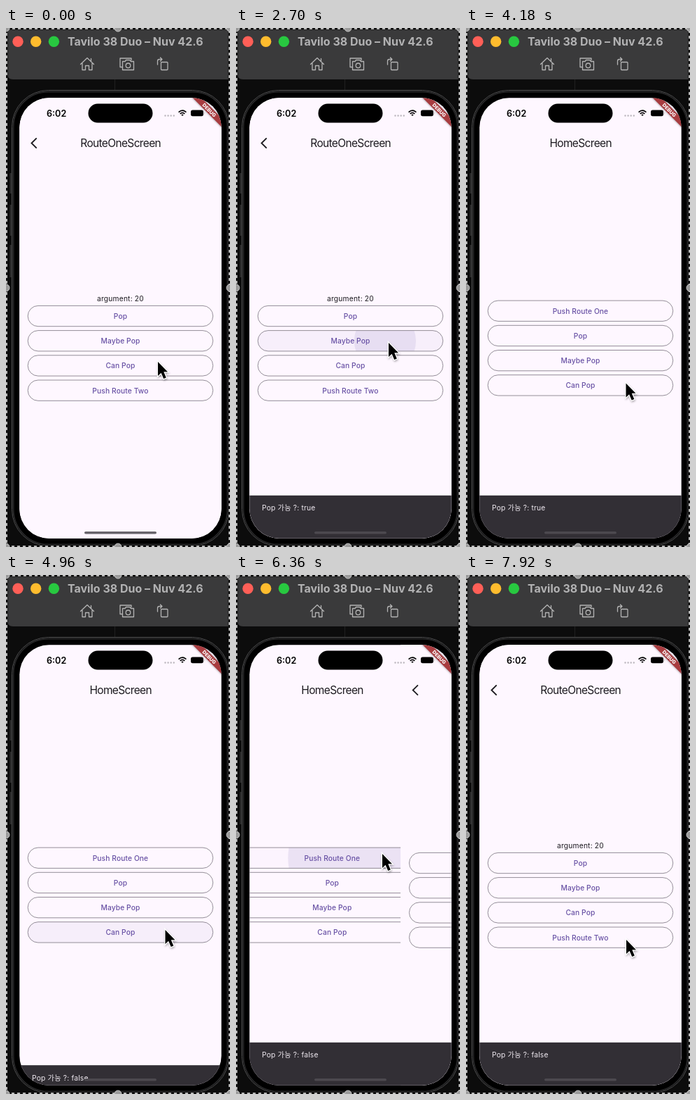
Write an HTML page that moves like this. It is 320 px wide and 737 px high and loops after 8 s.

```html
<!DOCTYPE html>
<html lang="en">
<head>
<meta charset="utf-8">
<title>Route navigation demo</title>
<style>
  html, body { margin: 0; width: 100%; height: 100%; overflow: hidden; background: #0c0c0c; }
  svg { display: block; width: 320px; height: 737px; }
  text { font-family: Inter, "Noto Sans CJK KR", "Noto Sans CJK", sans-serif; }
  .mid { text-anchor: middle; }
  .heading { font-size: 15.5px; letter-spacing: -.65px; fill: #1d1b20; }
  .body { font-size: 10.26px; letter-spacing: .18px; fill: #1d1b20; }
  .label { font-size: 10.26px; font-weight: 500; letter-spacing: .1px; fill: #6750a4; }
  .icon { fill: none; stroke: #b4b4b4; stroke-width: 1.3; stroke-linejoin: round; stroke-linecap: round; }
</style>
</head>
<body>
<svg viewBox="0 0 320 737">
  <defs>
    <clipPath id="screen"><rect x="19.300" y="99.200" width="288.400" height="625.600" rx="42"/></clipPath>
    <clipPath id="pill"><rect width="264.5" height="29.3" rx="14.65"/></clipPath>
    <clipPath id="homeClip"><rect id="homeArea" x="19" y="99" width="289" height="626"/></clipPath>
    <filter id="soft" x="-50%" y="-50%" width="200%" height="200%"><feGaussianBlur stdDeviation="1.5"/></filter>
  </defs>

  <!-- window -->
  <rect width="320" height="737" fill="#0c0c0c"/>
  <path d="M155.500 73V89" stroke="#202020"/>
  <path d="M2 1H320V73H10Q2 73 2 65Z" fill="#3a3a3b"/>
  <g id="lights"></g>
  <text x="88" y="25" font-size="16" font-weight="700" fill="#b2b2b3">Tavilo 38 Duo – Nuv 42.6</text>
  <g class="icon">
    <path d="M106.500 51.500L116 42.500L125.500 51.500M109 50V59.500H113.500V53.500H118.500V59.500H123V50M121.500 47V43.500"/>
    <path d="M166 55.500H163V43H179V45.500"/>
    <path d="M166.500 47.500H170L171.500 45.500H177L178.500 47.500H182.500V59.500H166.500Z"/>
    <circle cx="174.500" cy="53.300" r="3.300"/>
    <rect x="221.500" y="48.500" width="9.500" height="11" rx="1"/>
    <path d="M216.500 52V47Q216.500 44.500 219 44.500H223M220.500 42L223 44.500L220.500 47"/>
  </g>

  <!-- phone body -->
  <path d="M6.500 206V235M6.500 251V295M6.500 308V354" stroke="#303030" stroke-width="2"/>
  <rect x="8.500" y="88.500" width="310" height="647" rx="52" fill="#000" stroke="#505051"/>
  <rect x="10.500" y="90.500" width="306" height="643" rx="50" fill="none" stroke="#262627" stroke-width="2"/>

  <!-- screen -->
  <g clip-path="url(#screen)">
    <rect x="19" y="99" width="289" height="626" fill="#fef7ff"/>
    <g clip-path="url(#homeClip)"><g id="home"></g></g>
    <g id="route"></g>
    <g id="snack">
      <rect x="19" y="0" width="289" height="62" fill="#322f35"/>
      <text id="message" class="body" x="37" y="21.400" style="fill:#f0eaf1"></text>
    </g>
    <rect id="bar" x="112" y="715" width="103" height="3.600" rx="1.800"/>
    <text x="58" y="125.500" font-size="12.600" font-weight="600">6:02</text>
    <rect x="117.500" y="107.500" width="92" height="27" rx="13.500"/>
    <path d="M227.500 124.500H241" stroke="#bbb6bd" stroke-width="2.400" stroke-linecap="round" stroke-dasharray="0 4.100"/>
    <g fill="none" stroke="#000" stroke-width="1.700">
      <path d="M246.600 119.600Q252 114.500 257.400 119.600M248.700 121.900Q252 118.800 255.300 121.900"/>
      <path d="M250.300 123.200L252 125L253.700 123.200Q252 121.800 250.300 123.200Z" fill="#000" stroke="none"/>
    </g>
    <rect x="264" y="116.600" width="18" height="8.600" rx="2.600"/>
    <path d="M283.300 119.300Q284.600 120.900 283.300 122.500Z" fill="#777"/>
    <g transform="translate(308 99) rotate(45)">
      <rect x="-42" y="20.500" width="84" height="8.800" fill="#000" opacity=".5" filter="url(#soft)"/>
      <rect x="-42" y="20.500" width="84" height="8.800" fill="#a83c40"/>
      <text class="mid" y="27.500" font-size="7" font-weight="800" fill="#fff">DEBUG</text>
    </g>
  </g>

  <!-- selection border -->
  <rect x="1" y="1" width="318" height="735" fill="none" stroke="#111" stroke-width="3"/>
  <rect x="1" y="1" width="318" height="735" fill="none" stroke="#b5b5b5" stroke-width="2" stroke-dasharray="4 4"/>
  <g id="handles" fill="#9b9b9b" stroke="#c9c9c9"></g>

  <g id="cursor">
    <path d="M0 0V20L4.600 15.700L8.200 24L11.800 22.500L8.300 14.300H14Z" transform="translate(.6 1.600)" fill="#000" stroke="#000" stroke-width="2" opacity=".35" filter="url(#soft)"/>
    <path d="M0 0V20L4.600 15.700L8.200 24L11.800 22.500L8.300 14.300H14Z" fill="#000" stroke="#fff" stroke-width="2.600" paint-order="stroke"/>
  </g>
</svg>

<script>
const LOOP = 8000, LEFT = 31.2, WIDTH = 264.5, TALL = 29.3, PITCH = 35.2;
const POP = 2760, PUSH = 6309, SLIDE = 500;
const $ = id => document.getElementById(id);
const clamp = v => Math.min(1, Math.max(0, v));
const span = (t, from, length) => clamp((t - from) / length);

function bezier(x1, y1, x2, y2) {
  const at = (a, b, s) => 3 * a * s * (1 - s) ** 2 + 3 * b * s * s * (1 - s) + s ** 3;
  return x => {
    if (x <= 0) return 0;
    if (x >= 1) return 1;
    let lo = 0, hi = 1;
    for (let i = 0; i < 22; i++) {
      const s = (lo + hi) / 2;
      if (at(x1, x2, s) < x) lo = s; else hi = s;
    }
    return at(y1, y2, lo);
  };
}
const ease = bezier(.25, .1, .25, 1);
const fastOut = bezier(.4, 0, .2, 1);
const glide = bezier(.42, 0, .58, 1);
const parallax = bezier(.35, .91, .33, .97);
const slideIn = bezier(.283, .0444, .5455, .5702);
const slideOut = bezier(.2089, 1, .4345, .976);
const slide = u => u < .198 ? slideIn(u / .198) * .541 : .541 + slideOut((u - .198) / .802) * .459;

function buttons(labels, top) {
  return labels.map((label, i) => `
    <g transform="translate(${LEFT} ${top + i * PITCH})">
      <g clip-path="url(#pill)" fill="#6750a4">
        <rect class="glow" width="${WIDTH}" height="${TALL}" opacity="0"/>
        <circle class="ink" opacity="0"/>
      </g>
      <rect width="${WIDTH}" height="${TALL}" rx="${TALL / 2}" fill="none" stroke="#79747e" stroke-width=".8"/>
      <text class="label mid" x="${WIDTH / 2}" y="18.5">${label}</text>
    </g>`).join('');
}
const heading = name => `<text class="heading mid" x="163.700" y="169.200">${name}</text>`;

$('home').innerHTML = heading('HomeScreen') +
  buttons(['Push Route One', 'Pop', 'Maybe Pop', 'Can Pop'], 387.1);
$('route').innerHTML = '<rect x="19" y="99" width="289" height="626" fill="#fef7ff"/>' +
  '<path d="M43.700 156.300L36.500 163.500L43.700 170.700" fill="none" stroke="#1d1b20" stroke-width="1.900"/>' +
  heading('RouteOneScreen') + '<text class="body mid" x="163.500" y="387.600">argument: 20</text>' +
  buttons(['Pop', 'Maybe Pop', 'Can Pop', 'Push Route Two'], 394.4);
$('lights').innerHTML = ['#ff5f57', '#febc2e', '#28c840']
  .map((c, i) => `<circle cx="${17 + i * 25.7}" cy="19.2" r="7.7" fill="${c}"/>`).join('');
$('handles').innerHTML = [[0, 0], [160, 0], [320, 0], [0, 369], [320, 369], [0, 737], [160, 737], [320, 737]]
  .map(([x, y]) => `<circle cx="${x}" cy="${y}" r="5"/>`).join('');

// page, button, press, release, touch x
const taps = [
  ['route', 2, 300, 325, 215],
  ['route', 1, 2700, POP, 213],
  ['home', 3, 4640, 4655, 227],
  ['home', 0, 6280, 6300, 207]
].map(([page, n, press, release, x]) => ({
  press, release, x: x - LEFT,
  ink: $(page).querySelectorAll('.ink')[n],
  glow: $(page).querySelectorAll('.glow')[n]
}));

// time, x, y of the pointer tip
const path = [
  [0, 217, 474], [400, 217, 474], [600, 214, 476], [1620, 214, 476],
  [2000, 217.5, 453.5], [2280, 217.5, 453.5], [2500, 218, 447], [2820, 218, 447],
  [3220, 216, 398], [3520, 216, 398], [4180, 228.5, 504.5], [4640, 228.5, 504.5],
  [4800, 227.5, 504], [5460, 227.5, 504], [5580, 229.5, 504.5], [6010, 205, 403],
  [6120, 207, 400], [6280, 207, 400], [6360, 209, 396], [6520, 209, 396],
  [7080, 208, 506], [7120, 208, 508], [7220, 208, 512], [7480, 208, 512],
  [7900, 229, 518], [8000, 229, 518]
];

function drawTap(tap, t) {
  const { press, release, ink, glow, x } = tap;
  const on = t >= press && t < release + 375;
  const held = (Math.min(t, release) - press) / 1000;
  const grow = held + (1 - held) * ease(span(t, release, 225));
  ink.setAttribute('cx', x + (WIDTH / 2 - x) * grow);
  ink.setAttribute('cy', TALL / 2);
  ink.setAttribute('r', 44 + 91 * grow);
  ink.setAttribute('opacity', on ? .11 * (1 - span(t, release + 225, 150)) : 0);
  glow.setAttribute('opacity', on ? .045 * (1 - span(t, release, 100)) : 0);
}

function drawPages(t) {
  const pushing = t >= PUSH;
  const u = span(t, pushing ? PUSH : POP, SLIDE);
  const toward = v => pushing ? v : 1 - v;
  const offset = 289 * (1 - toward(slide(u)));
  $('route').setAttribute('transform', `translate(${offset} 0)`);
  $('home').setAttribute('transform', `translate(${-96 * toward(parallax(u))} 0)`);
  $('homeArea').setAttribute('width', offset);
}

function drawSnack(t) {
  const second = t >= 4878;
  const first = fastOut(span(t, 330, 250));
  const open = second ? fastOut(span(t, 4878, 245))
    : t >= 4650 ? fastOut(1 - span(t, 4650, 225))
    : first;
  $('message').textContent = 'Pop 가능 ?: ' + (second ? 'false' : 'true');
  $('snack').setAttribute('transform', `translate(0 ${725 - 61.2 * open})`);
  // the home bar keeps its dark tone between the two messages
  const shade = Math.round(104 - 28 * first);
  $('bar').setAttribute('fill', `rgb(${shade},${shade - 3},${shade + 3})`);
}

function drawCursor(t) {
  const i = Math.max(1, path.findIndex(p => p[0] > t));
  const [t0, x0, y0] = path[i - 1], [t1, x1, y1] = path[i];
  const k = glide(span(t, t0, t1 - t0));
  $('cursor').setAttribute('transform', `translate(${x0 + (x1 - x0) * k} ${y0 + (y1 - y0) * k})`);
}

function frame() {
  const t = performance.now() % LOOP;
  drawPages(t);
  taps.forEach(tap => drawTap(tap, t));
  drawSnack(t);
  drawCursor(t);
  requestAnimationFrame(frame);
}
frame();
</script>
</body>
</html>
```
